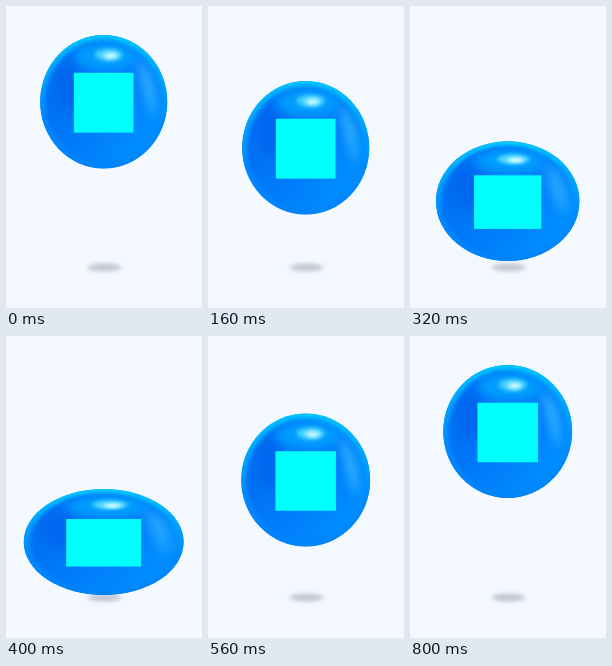
These frames come from a looping animation (196 by 302 pixels, 0.84 s). An HTML page:

```html
<!DOCTYPE html>
<html lang="en">
<head>
<meta charset="utf-8">
<title>Bouncing ball</title>
<style>
  html, body { margin: 0; width: 100%; height: 100%; overflow: hidden; background: #f4f8ff; }
  svg { display: block; width: 100%; height: 100%; }
</style>
</head>
<body>
<svg viewBox="0 0 196 302">
  <defs>
    <linearGradient id="body" x1=".1" y1=".25" x2=".9" y2=".8">
      <stop offset="0" stop-color="#006cf2"/>
      <stop offset=".5" stop-color="#007cfa"/>
      <stop offset="1" stop-color="#0090ff"/>
    </linearGradient>
    <linearGradient id="rim" x1="0" y1="0" x2="0" y2="1">
      <stop offset="0" stop-color="#00c8ff"/>
      <stop offset=".3" stop-color="#00a8ff"/>
      <stop offset=".65" stop-color="#0088ff"/>
      <stop offset="1" stop-color="#0084fa"/>
    </linearGradient>
    <filter id="soft" x="-60%" y="-60%" width="220%" height="220%"><feGaussianBlur stdDeviation="5"/></filter>
    <filter id="glint" x="-60%" y="-90%" width="220%" height="280%"><feGaussianBlur stdDeviation="2"/></filter>
    <clipPath id="edge"><ellipse rx="64" ry="67"/></clipPath>
  </defs>
  <ellipse cx="98.5" cy="261.5" rx="17" ry="4" fill="#c4c6d0" filter="url(#glint)"/>
  <g id="ball" clip-path="url(#edge)">
    <ellipse rx="64" ry="67" fill="url(#body)"/>
    <ellipse cx="2" cy="-45" rx="32" ry="14" fill="#009cff" filter="url(#soft)"/>
    <ellipse cx="-36" cy="-14" rx="11" ry="24" fill="#0062ec" opacity=".7" filter="url(#soft)"/>
    <path d="M34-44Q56-22 50 18Q40-8 34-44" fill="#30b4ff" filter="url(#soft)"/>
    <ellipse rx="64" ry="67" fill="none" stroke="url(#rim)" stroke-width="10" filter="url(#glint)"/>
    <ellipse cx="5" cy="-47" rx="14" ry="6" fill="#48d4ff" filter="url(#glint)"/>
    <ellipse cx="7" cy="-46" rx="7" ry="3" fill="#d4fcff" filter="url(#glint)"/>
    <rect x="-30" y="-29" width="60" height="60" fill="#00ffff"/>
  </g>
</svg>
<script>
  const LOOP = 840, STEP = 40;
  // time, centre y, horizontal radius, vertical radius
  const poses = [
    [0, 95.7, 63.6, 66.8], [160, 141.7, 63.6, 66.8], [240, 173.7, 63.6, 66.8],
    [400, 206, 80, 53], [480, 175, 68, 64.5], [560, 144, 64.5, 66.5],
    [640, 118.5, 64.5, 66.5], [800, 95.5, 64.5, 66.5], [840, 95.7, 63.6, 66.8]
  ];
  const ball = document.getElementById('ball');

  const slope = (i, k) => (poses[i + 1][k] - poses[i][k]) / (poses[i + 1][0] - poses[i][0]);

  // Harmonic tangents keep the curve from overshooting
  function tangent(i, k) {
    if (i === 0) return k === 1 ? 0.2 : 0;
    if (i === poses.length - 1) return 0;
    const a = slope(i - 1, k), b = slope(i, k);
    return a * b > 0 ? 2 * a * b / (a + b) : 0;
  }

  function valueAt(t, k) {
    const i = poses.findIndex((p, n) => t < poses[n + 1][0]);
    const [p, q] = [poses[i], poses[i + 1]];
    const span = q[0] - p[0], u = (t - p[0]) / span, v = 1 - u;
    return p[k] + (q[k] - p[k]) * u * u * (3 - 2 * u)
      + span * u * v * (tangent(i, k) * v - tangent(i + 1, k) * u);
  }

  function draw(now) {
    const t = Math.floor(now % LOOP / STEP) * STEP;
    const [y, rx, ry] = [1, 2, 3].map(k => valueAt(t, k));
    ball.setAttribute('transform', `translate(97.7 ${y}) scale(${rx / 64} ${ry / 67})`);
  }

  const start = performance.now();
  function tick() {
    draw(performance.now() - start);
    requestAnimationFrame(tick);
  }
  tick();
</script>
</body>
</html>
```
